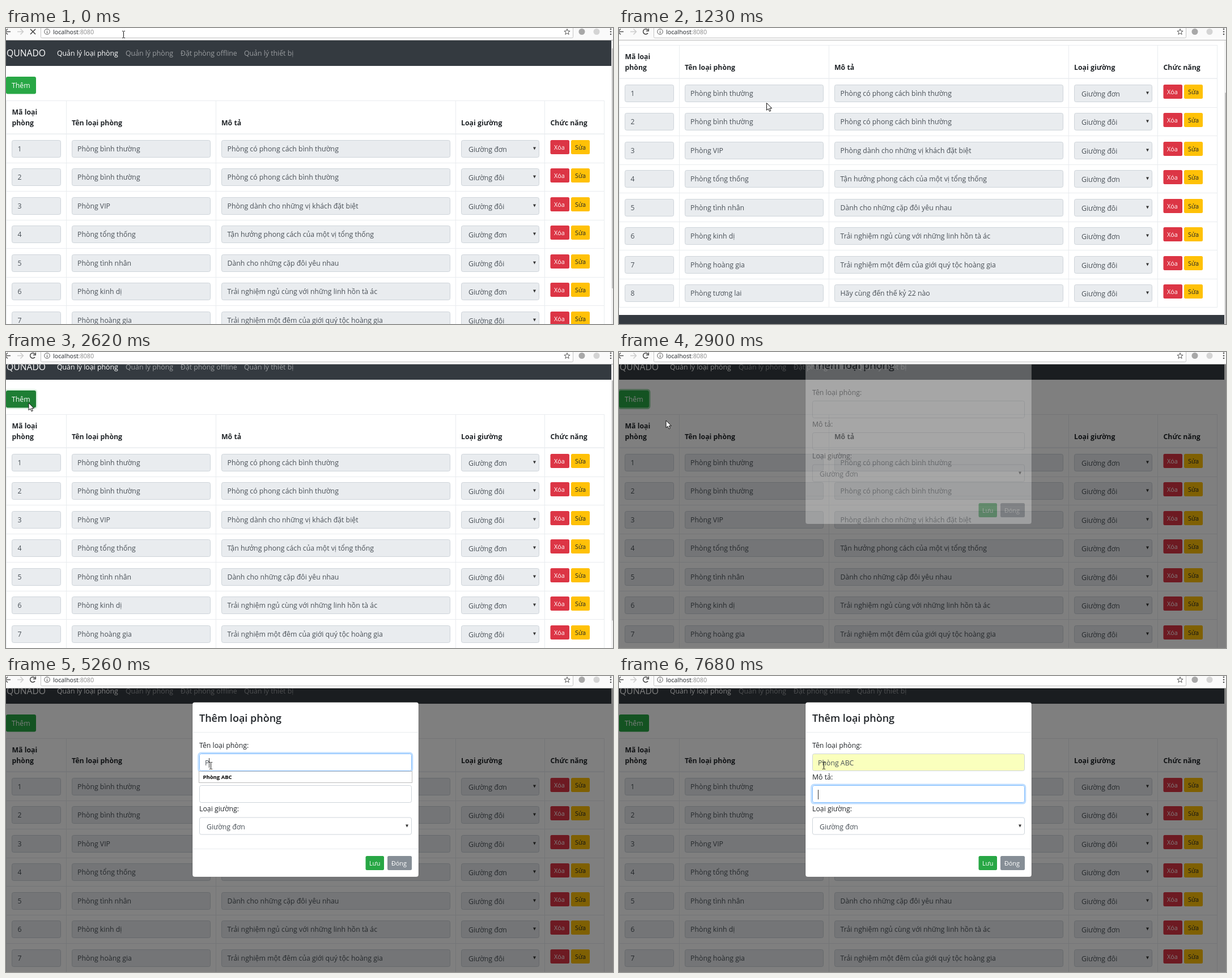
These frames come from a looping animation (1071x523 px, 8000 ms). An HTML page:

```html
<!DOCTYPE html>
<html lang="vi">
<head>
<meta charset="utf-8">
<title>Quản lý loại phòng</title>
<style>
html, body { margin: 0; width: 100%; height: 100%; overflow: hidden; background: #fff; }
svg { display: block; width: 1071px; height: 523px; }
text { font: 12.3px "Open Sans", "Noto Sans", sans-serif; fill: #212529; white-space: pre; }
.b { font-weight: 700; }
.in { fill: #495057; }
.sm { font-size: 10.8px; }
.url { font-size: 10.7px; }
.brand { font-size: 15.7px; fill: #fff; }
.title { font-size: 18px; font-weight: 600; }
.hint { font-size: 9.5px; font-weight: 700; fill: #000; }
.w { fill: #fff; }
.dim { fill: #999c9f; }
</style>
</head>
<body>
<svg id="stage" viewBox="0 0 1071 523"></svg>
<script>
const stage = document.getElementById('stage');
const NS = 'http://www.w3.org/2000/svg';

function add(parent, tag, attrs = {}) {
  const el = document.createElementNS(NS, tag);
  set(el, attrs);
  parent.appendChild(el);
  return el;
}
function set(el, attrs) {
  for (const k in attrs) el.setAttribute(k, attrs[k]);
}
const group = p => add(p, 'g');
const rect = (p, x, y, width, height, fill, more = {}) =>
  add(p, 'rect', { x, y, width, height, fill, ...more });
const path = (p, d, stroke, more = {}) =>
  add(p, 'path', { d, stroke, fill: 'none', ...more });
function text(p, x, y, str, cls = '') {
  const el = add(p, 'text', { x, y, class: cls });
  el.textContent = str;
  return el;
}
const field = (p, x, y, w, fill) =>
  rect(p, x + .5, y + .5, w - 1, 30, fill, { rx: 3, stroke: '#ced4da' });
function button(p, x, y, w, fill, label, tx, cls = 'sm w') {
  rect(p, x, y, w, 25, fill, { rx: 2.5 });
  text(p, tx, y + 16.5, label, cls);
}
const caretDown = (p, x, y) =>
  add(p, 'path', { d: `M${x - 2.5} ${y - 2}h5l-2.5 5z`, fill: '#333' });

// Page
const page = group(stage);
rect(page, 0, 22, 1068, 45, '#343a40');
text(page, 1, 50, 'QUNADO', 'brand');
text(page, 90, 49, 'Quản lý loại phòng', 'w');
text(page, 211, 49, 'Quản lý phòng', 'dim');
text(page, 308, 49, 'Đặt phòng offline', 'dim');
text(page, 420, 49, 'Quản lý thiết bị', 'dim');

const ring = rect(page, -1.2, 84.8, 55.4, 32.9, 'none', { rx: 4, stroke: '#28a745', 'stroke-width': 2.5 });
const addBtn = rect(page, 0, 86, 53, 30.5, '#28a745', { rx: 3.2 });
text(page, 10, 105.5, 'Thêm', 'w');

const rows = [
  ['Phòng bình thường', 'Phòng có phong cách bình thường', 'đơn'],
  ['Phòng bình thường', 'Phòng có phong cách bình thường', 'đôi'],
  ['Phòng VIP', 'Phòng dành cho những vị khách đặt biệt', 'đôi'],
  ['Phòng tổng thống', 'Tận hưởng phong cách của một vị tổng thống', 'đơn'],
  ['Phòng tình nhân', 'Dành cho những cặp đôi yêu nhau', 'đôi'],
  ['Phòng kinh dị', 'Trải nghiệm ngủ cùng với những linh hồn tà ác', 'đơn'],
  ['Phòng hoàng gia', 'Trải nghiệm một đêm của giới quý tộc hoàng gia', 'đôi'],
  ['Phòng tương lai', 'Hãy cùng đến thế kỷ 22 nào', 'đôi']
];
const LINE = '#e9ecef';
for (const x of [0, 106, 370, 793, 950, 1055]) rect(page, x, 128, 1, 464, LINE);
rect(page, 0, 128, 1056, 1, LINE);
rect(page, 0, 186.5, 1056, 1.5, LINE);
text(page, 10.5, 152.5, 'Mã loại', 'b');
text(page, 10.5, 172, 'phòng', 'b');
text(page, 116, 172, 'Tên loại phòng', 'b');
text(page, 380, 172, 'Mô tả', 'b');
text(page, 803, 172, 'Loại giường', 'b');
text(page, 960.5, 172, 'Chức năng', 'b');
rows.forEach(([name, note, bed], i) => {
  const y = Math.round(198 + 50.43 * i);
  for (const [x, w] of [[10, 87], [116, 245], [380, 404], [803, 138]]) field(page, x, y, w, '#e9ecef');
  text(page, 20.5, y + 20, i + 1, 'in');
  text(page, 126, y + 20, name, 'in');
  text(page, 390.5, y + 20, note, 'in');
  text(page, 816, y + 21, 'Giường ' + bed, 'in');
  caretDown(page, 932.5, y + 14.5);
  button(page, 960.5, y, 33.5, '#dc3545', 'Xóa', 967);
  button(page, 997, y, 33, '#ffc107', 'Sửa', 1004, 'sm');
  rect(page, 0, y + 40, 1056, 1, LINE);
});
rect(page, 0, 605, 1068, 20, '#343a40');

const bar = group(stage);
rect(bar, 1068, 22, 3, 501, '#f1f1f1');
const thumb = rect(bar, 1069, 36, 2, 424, '#c1c1c1');

// Dialog
const shade = rect(stage, 0, 22, 1071, 501, '#000');
const modal = group(stage);
rect(modal, 329, 46.5, 399, 308.5, '#fff', { rx: 4, stroke: '#000', 'stroke-opacity': .2 });
text(modal, 341, 80.5, 'Thêm loại phòng', 'title');
rect(modal, 329, 99, 399, 1, LINE);
text(modal, 341, 126.5, 'Tên loại phòng:');
text(modal, 341, 182.5, 'Mô tả:');
text(modal, 341, 238.5, 'Loại giường:');
const glow = y => rect(modal, 339.5, y - 1.2, 377.5, 33.5, 'none',
  { rx: 4.5, stroke: '#bfdeff', 'stroke-width': 2.6 });
const nameGlow = glow(137), noteGlow = glow(193);
const nameBox = field(modal, 341, 137, 375, '#fff');
const noteBox = field(modal, 341, 193, 375, '#fff');
const typed = text(modal, 351, 157.5, '', 'in');
const caret = rect(modal, 351, 145, 1, 17, '#333');
field(modal, 341, 249.5, 375, '#fff');
text(modal, 354, 270.5, 'Giường đơn', 'in');
caretDown(modal, 707.5, 264.5);
rect(modal, 329, 305, 399, 1, LINE);
button(modal, 634.5, 318, 32.5, '#28a745', 'Lưu', 641);
button(modal, 673, 318, 43, '#868e96', 'Đóng', 680);
const drop = group(modal);
const dropBox = rect(drop, 340.5, 168.5, 376, 20, '#fff', { stroke: '#bbb' });
text(drop, 347.5, 182, 'Phòng ABC', 'hint');

// Browser bar
const chrome = group(stage);
rect(chrome, 0, 0, 1071, 21, '#fafafa');
rect(chrome, 0, 21, 1071, 1, '#b6b6b6');
rect(chrome, 61.5, -5, 939, 22.5, '#fff', { rx: 2, stroke: '#c4c4c4' });
path(chrome, 'M8 6.5H-3M3 1.5L-2 6.5L3 11.5', '#555', { 'stroke-width': 1.5 });
path(chrome, 'M20 6.5H30M25.5 1.5L30.5 6.5L25.5 11.5', '#ccc', { 'stroke-width': 1.5 });
const stop = path(chrome, 'M43 2L52 11M52 2L43 11', '#444', { 'stroke-width': 1.6 });
const reload = path(chrome, 'M51 9A4.6 4.6 0 1 1 50.8 3.4M52.2 1V5.2H48', '#444', { 'stroke-width': 1.5 });
add(chrome, 'circle', { cx: 72.5, cy: 6.5, r: 4.8, fill: 'none', stroke: '#555' });
path(chrome, 'M72.5 5.8V9.5M72.5 3.4V4.6', '#555', { 'stroke-width': 1.2 });
const url = text(chrome, 83, 10.5, 'localhost', 'url');
add(url, 'tspan', { fill: '#888' }).textContent = ':8080';
const star = [...Array(10)].map((_, i) => {
  const a = i * Math.PI / 5, r = i % 2 ? 2.3 : 5.4;
  return (990 + r * Math.sin(a)) + ',' + (7 - r * Math.cos(a));
});
add(chrome, 'polygon', { points: star.join(' '), fill: 'none', stroke: '#555' });
add(chrome, 'circle', { cx: 1016, cy: 6.5, r: 5.5, fill: '#a8a8a8' });
add(chrome, 'circle', { cx: 1042, cy: 6.5, r: 5.5, fill: '#d4d4d4' });
for (const cy of [2, 6.5, 11]) add(chrome, 'circle', { cx: 1067, cy, r: 1.3, fill: '#555' });

// Mouse pointers, hot spot at 0,0
const arrow = add(stage, 'path', {
  d: 'M0 0V12.8L3 10.2L5 14.8L7.2 13.9L5.2 9.4H9.2Z', fill: '#fff', stroke: '#111', 'stroke-width': 1
});
const beam = path(stage, 'M-2.5 -6H-.8L0 -5.2L.8 -6H2.5M0 -5.2V5.2M-2.5 6H-.8L0 5.2L.8 6H2.5', '#111');

// Tracks: each step holds until the next
const mouse = [
  [0, 207.5, 11.5, 1], [400, 212, 23, 0], [540, 225, 58, 0], [680, 241, 95, 0], [820, 255, 122, 0],
  [960, 260.5, 132.5, 0], [2060, 232, 126, 0], [2200, 158, 110, 0], [2340, 82, 95, 0],
  [2480, 40, 90, 0], [2770, 50, 100, 0], [2900, 83, 121, 0], [3050, 160, 146, 0],
  [3190, 250, 162, 0], [3330, 315, 163, 0], [3470, 350, 160, 1], [3610, 361.5, 158.5, 1]
];
const scroll = [[0, 0], [960, 1], [1100, 62], [1230, 98], [1640, 92], [1780, 38], [1920, 18]];
const addState = [
  [0, '#28a745', 0], [2480, '#218838', 0], [2620, '#1e7e34', .15],
  [2770, '#218838', .5], [2900, '#28a745', .5], [3890, '#28a745', 0]
];
// time, shade, dialog opacity, dialog offset
const dialog = [[0, 0, 0, -77], [2770, .22, 0, -77], [2900, .5, .3, -51], [3050, .5, 1, -8], [3190, .5, 1, 0]];
// time, text, suggestion (2 = highlighted), autofilled, name focus, note focus, caret (2 = note)
const form = [
  [0, '', 0, 0, 0, 0, 0],
  [3890, '', 0, 0, 1, 0, 1],
  [4430, '', 0, 0, 1, 0, 0],
  [4820, '', 0, 0, 1, 0, 1],
  [5110, 'P', 0, 0, 1, 0, 1],
  [5260, 'P', 1, 0, 1, 0, 1],
  [5390, 'Ph', 1, 0, 1, 0, 1],
  [5530, 'Pho', 0, 0, 1, 0, 1],
  [5670, 'Phon', 0, 0, 1, 0, 1],
  [5800, 'Phong', 0, 0, 1, 0, 1],
  [6090, 'Phòng ', 1, 0, 1, 0, 1],
  [6620, 'Phòng ', 1, 0, 1, 0, 0],
  [7000, 'Phòng ABC', 2, 1, 1, 0, 0],
  [7140, 'Phòng ABC', 0, 1, 1, 0, 1],
  [7420, 'Phòng ABC', 0, 1, .7, .3, 2],
  [7550, 'Phòng ABC', 0, 1, .1, .9, 2],
  [7680, 'Phòng ABC', 0, 1, 0, 1, 2]
];
const at = (track, t) => track.findLast(step => step[0] <= t);
const show = (el, on) => el.setAttribute('visibility', on ? 'visible' : 'hidden');

function focus(box, halo, k) {
  halo.setAttribute('opacity', k);
  box.setAttribute('stroke', k > .5 ? '#80bdff' : '#ced4da');
}

function render(t) {
  show(stop, t < 130);
  show(reload, t >= 130);

  const y = at(scroll, t)[1];
  page.setAttribute('transform', `translate(0 ${-y})`);
  thumb.setAttribute('y', 36 + y * .8);
  show(bar, t < 2770);

  const [, fill, halo] = at(addState, t);
  addBtn.setAttribute('fill', fill);
  ring.setAttribute('opacity', halo);

  const [, dark, alpha, dy] = at(dialog, t);
  shade.setAttribute('opacity', dark);
  set(modal, { opacity: alpha, transform: `translate(0 ${dy})` });

  const [, str, hint, filled, f1, f2, blink] = at(form, t);
  if (typed.textContent !== str) typed.textContent = str;
  nameBox.setAttribute('fill', filled ? '#faffbd' : '#fff');
  focus(nameBox, nameGlow, f1);
  focus(noteBox, noteGlow, f2);
  drop.setAttribute('opacity', hint ? 1 : 0);
  dropBox.setAttribute('fill', hint > 1 ? '#e4e4e4' : '#fff');
  const end = blink === 1 && str ? Math.round(typed.getComputedTextLength()) : 0;
  set(caret, { x: 351 + end, y: blink === 2 ? 201 : 145, opacity: blink ? 1 : 0 });

  const [, mx, my, isBeam] = at(mouse, t);
  for (const el of [arrow, beam]) el.setAttribute('transform', `translate(${mx} ${my})`);
  show(arrow, !isBeam);
  show(beam, isBeam);
}

const start = performance.now();
function tick() {
  render((performance.now() - start) % 8000);
  requestAnimationFrame(tick);
}
tick();
</script>
</body>
</html>
```
